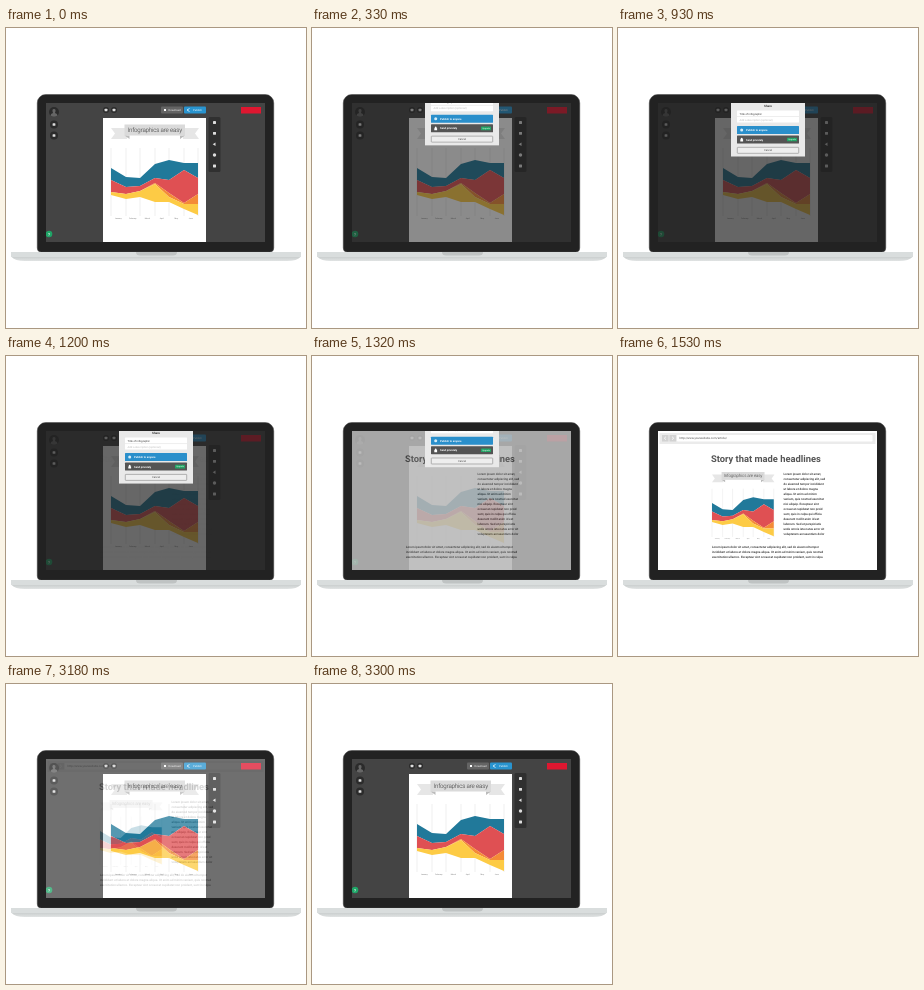
Animation, 300 px wide and 300 px high, one loop 3600 ms. Source, as an HTML page:

```html
<!DOCTYPE html>
<html lang="en">
<head>
<meta charset="utf-8">
<title>Publish an infographic</title>
<style>
html, body { margin: 0; width: 100%; height: 100%; overflow: hidden; background: #fff; }
svg { display: block; width: 100vw; height: 100vh; font-family: Roboto, sans-serif; text-rendering: geometricPrecision; }
</style>
</head>
<body>
<svg viewBox="0 0 300 300">
  <defs>
    <clipPath id="screen"><rect x="40" y="75" width="219" height="139"/></clipPath>
    <linearGradient id="edge" x2="0" y2="1">
      <stop stop-color="#c8cccc"/><stop offset="1" stop-color="#e0e3e3"/>
    </linearGradient>
    <g id="graphic">
      <path d="M105 100h16v11h-16l4-5.5zM193 100h-16v11h16l-4-5.5z" fill="#e6e6e6"/>
      <path d="M118.500 107.500h5v3.500zM179 107.500h-5v3.500z" fill="#bbb"/>
      <rect x="118.500" y="96.500" width="60.500" height="11" fill="#dadada"/>
      <text x="148.700" y="104.200" font-size="6.200" font-weight="300" letter-spacing="-.17" text-anchor="middle" fill="#333">Infographics are easy</text>
      <g id="chart"></g>
    </g>
  </defs>

  <path d="M31.250 220V75a8.500 8.500 0 0 1 8.500-8.500H259.250a8.500 8.500 0 0 1 8.500 8.500V220q0 4-4 4H35.250q-4 0-4-4z" fill="#222" stroke="#444" stroke-width=".5"/>
  <path d="M5 228.500H295Q291 233 281 233H19Q9 233 5 228.500z" fill="url(#edge)"/>
  <rect x="5" y="224" width="290" height="5" fill="#d9dddd"/>
  <path d="M130 224h41q0 3.500-4 3.500h-33q-4 0-4-3.500z" fill="#bfc3c3"/>

  <g clip-path="url(#screen)">
    <g id="editor">
      <rect x="40" y="75" width="219" height="139" fill="#444"/>
      <rect x="97" y="90" width="103" height="124" fill="#fff"/>
      <use href="#graphic"/>
      <circle cx="48" cy="84" r="5" fill="#2b2b2b"/>
      <path d="M44.500 87.500q0-2 2.500-2.500-1.500-4 1-4t1 4q2.500 .5 2.500 2.500-3.500 2.500-7 0z" fill="#666"/>
      <g id="icons"></g>
      <rect x="155" y="78.500" width="22" height="7" rx="1" fill="#646464"/>
      <path d="M158 81h2v2h-2z" fill="#fff"/>
      <text x="162.500" y="83" font-size="2.700" fill="#fff">Download</text>
      <rect x="178" y="78.500" width="22" height="7" rx="1" fill="#2994cf"/>
      <path d="M183.500 80.500l-2.500 1.500 2.500 1.500" fill="none" stroke="#fff" stroke-width=".7"/>
      <text x="187" y="83" font-size="2.700" fill="#fff">Publish</text>
      <rect x="235" y="79" width="20" height="6.500" fill="#de1730"/>
      <circle cx="43" cy="206" r="3.300" fill="#1fa567"/>
      <text x="43" y="207.500" font-size="4" font-weight="700" text-anchor="middle" fill="#fff">?</text>
    </g>

    <rect id="dim" x="40" y="75" width="219" height="139" fill="#1e1e1e"/>

    <g id="article">
      <rect x="40" y="75" width="219" height="139" fill="#fff"/>
      <g id="bar">
        <rect x="41.500" y="77" width="216" height="11" fill="#ebebeb"/>
        <rect x="59" y="79" width="195.500" height="6.500" rx=".8" fill="#fff"/>
      </g>
      <text x="93" y="106.300" font-size="9.350" font-weight="700" fill="#555">Story that made headlines</text>
      <g id="copy" font-size="3" font-weight="500" fill="#222"></g>
      <g id="late">
        <path d="M44 79h6.500v6.500h-6.500zM51.500 79h6.500v6.500h-6.500z" fill="#d2d2d2"/>
        <path d="M48 80.700l-1.700 1.500 1.700 1.500M54 80.700l1.700 1.500-1.700 1.500" fill="none" stroke="#fff" stroke-width=".8"/>
        <text x="61.500" y="83.200" font-size="2.900" fill="#444">http://www.yourwebsite.com/article/</text>
        <use href="#graphic" transform="translate(19.450 47.500) scale(.71)"/>
      </g>
    </g>

    <g id="modal" font-size="2.700">
      <rect x="113" y="60" width="74" height="68" fill="#e9e9e9"/>
      <text x="150" y="78.500" font-size="3" font-weight="700" text-anchor="middle" fill="#333">Share</text>
      <rect x="119" y="82" width="62" height="12" rx=".6" fill="#fff"/>
      <path d="M119 88h62" stroke="#ddd" stroke-width=".5"/>
      <text x="121.500" y="86" fill="#333">Title of infographic</text>
      <text x="121.500" y="92" fill="#bbb">Add a description (optional)</text>
      <rect x="119" y="97.500" width="62" height="8" rx=".6" fill="#2a8fcb"/>
      <circle cx="123.700" cy="101.500" r="1.500" fill="#d5ecf8"/>
      <text x="128" y="102.500" font-weight="700" fill="#fff">Publish to anyone</text>
      <rect x="119" y="107" width="62" height="8" rx=".6" fill="#545454"/>
      <path d="M122.300 110.800h2.800v2.200h-2.800zM122.800 110.800v-1q.9-1.200 1.800 0v1" fill="#fff"/>
      <text x="128" y="112" font-weight="700" fill="#fff">Send privately</text>
      <rect x="169" y="109.200" width="10" height="3.600" rx=".5" fill="#24a566"/>
      <text x="174" y="111.700" font-size="2" text-anchor="middle" fill="#fff">Upgrade</text>
      <rect x="119.300" y="118.800" width="61.400" height="6" rx=".5" fill="#eee" stroke="#888" stroke-width=".6"/>
      <text x="150" y="122.800" text-anchor="middle" fill="#444">Cancel</text>
    </g>
  </g>
</svg>
<script>
const $ = id => document.getElementById(id);
const xs = [105, 120, 134, 149, 163, 178, 192];

// Each band hangs from its top line and ends at the next one.
const bands = [
  ['#21799a', [140, 149, 150, 136, 132, 135, 135]],
  ['#df5053', [152, 159, 158, 150, 152, 142, 150]],
  ['#f48b37', [164, 166, 163, 155, 165, 175, 166]],
  ['#fdcb45', [164, 166, 163, 156, 169, 176, 176]],
  ['#fff', [167, 171, 169, 174, 174, 181, 187]]
];
const line = ys => ys.map((y, i) => `${xs[i]} ${y}`).join('L');
const grid = xs.map(x => `M${x} 120V188`).join('');
const months = ['January', 'February', 'March', 'April', 'May', 'June'];

$('chart').innerHTML =
  `<path d="${grid}" stroke="#ddd" stroke-width=".5"/>` +
  bands.slice(0, -1).map(([fill, top], i) => {
    const low = bands[i + 1][1].map((y, k) => `${xs[k]} ${y}`).reverse().join('L');
    return `<path d="M${line(top)}L${low}z" fill="${fill}"/>`;
  }).join('') +
  months.map((m, i) => `<text x="${112.3 + i * 14.5}" y="190.500" font-size="1.900" text-anchor="middle" fill="#777">${m}</text>`).join('');

const dot = (x, y, r) =>
  `<circle cx="${x}" cy="${y}" r="${r}" fill="#2b2b2b"/><rect x="${x - 1.4}" y="${y - 1.2}" width="2.800" height="2.400" rx=".5" fill="#ddd"/>`;
$('icons').innerHTML =
  dot(48, 96.5, 4) + dot(48, 107.5, 4) + dot(100, 82, 3) + dot(108, 82, 3) +
  '<rect x="202.500" y="89" width="12" height="55" rx="1.500" fill="#303030"/>' +
  [94.5, 105.3, 116.2, 127, 138].map((y, i) =>
    i === 2 ? `<path d="M206.700 ${y}l2.800-1.800v3.600z" fill="#ddd"/>` :
    i === 3 ? `<circle cx="208.500" cy="${y}" r="1.700" fill="#ddd"/>` :
    `<rect x="207" y="${y - 1.4}" width="3" height="2.800" rx=".4" fill="#ddd"/>`).join('');

const side = `Lorem ipsum dolor sit amet,
consectetur adipiscing elit, sed
do eiusmod tempor incididunt
ut labore et dolore magna
aliqua. Ut enim ad minim
veniam, quis nostrud exercitat
nisi aliquip. Excepteur sint
occaecat cupidatat non proid
sunt, quis in culpa qui officia
deserunt mollit anim id est
laborum. Sed ut perspiciatis
unde omnis iste natus error sit
voluptatem accusantium dolor`;
const foot = `Lorem ipsum dolor sit amet, consectetur adipiscing elit, sed do eiusmod tempor
incididunt ut labore et dolore magna aliqua. Ut enim ad minim veniam, quis nostrud
exercitation ullamco. Excepteur sint occaecat cupidatat non proident, sunt in culpa`;
const lines = (text, x, y) => text.split('\n')
  .map((s, i) => `<text x="${x}" y="${y + i * 5}">${s}</text>`).join('');
$('copy').innerHTML = lines(side, 165.5, 119.3) + lines(foot, 94, 191.8);

const part = (t, from, to) => Math.min(1, Math.max(0, (t - from) / (to - from)));
const fade = (id, v) => $(id).setAttribute('opacity', v);
const start = performance.now();

function draw() {
  const t = (performance.now() - start) % 3600;
  const drop = -56 * (1 - part(t, 60, 630)) ** 2.5;
  const lift = -145 * part(t, 930, 1440) ** 8;
  $('modal').setAttribute('transform', `translate(0 ${drop + lift + 0.5})`);
  fade('modal', t >= 90 && t < 1440 ? 1 : 0);
  fade('dim', t < 1530 ? 0.68 * part(t, 60, 420) : 0);

  const shown = 1 - (1 - part(t, 1200, 1470)) ** 1.5;
  const gone = Math.sin(part(t, 3030, 3300) * Math.PI / 2);
  fade('article', t < 3030 ? shown : 1 - gone);
  fade('bar', part(t, 1320, 1470));
  fade('late', part(t, 1350, 1530));
  requestAnimationFrame(draw);
}
draw();
</script>
</body>
</html>
```
